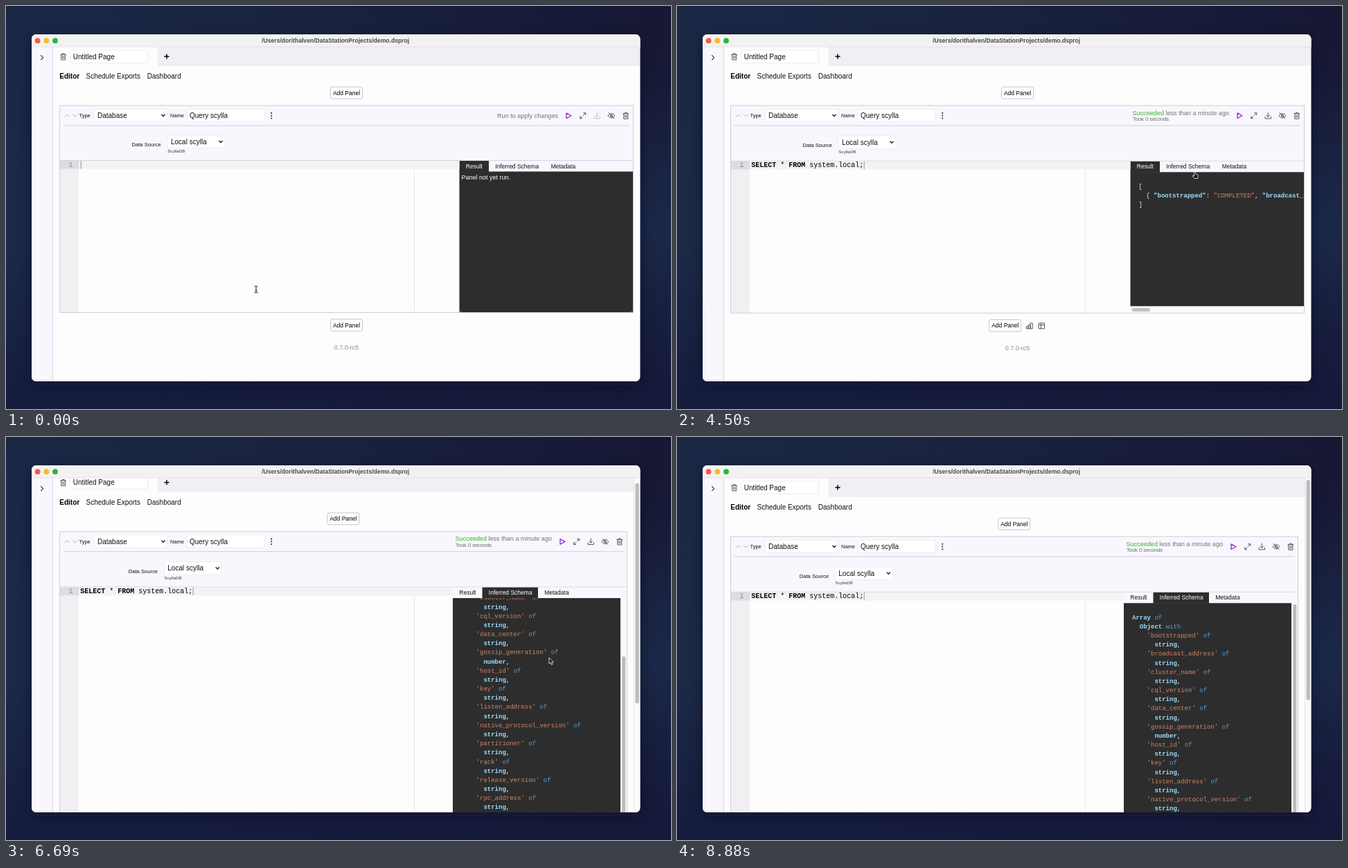
Animation of 960 by 583 pixels, one loop 8950 ms. Source, as an HTML page:

```html
<!DOCTYPE html>
<html lang="en">
<head>
<meta charset="utf-8">
<title>Query panel</title>
<style>
  html, body { margin: 0; width: 100%; height: 100%; overflow: hidden; background: #18203e; }
  svg { display: block; width: 100vw; height: 100vh; }
  text { font-family: "Liberation Sans", Arial, sans-serif; white-space: pre; }
  .mono { font-family: "Liberation Mono", "Courier New", monospace; }
  .b { font-weight: bold; }
  .key { fill: #9cdcfe; font-weight: bold; }
  .str { fill: #ce8567; }
  .word { fill: #569cd6; }
  .line { fill: none; stroke: #55555c; stroke-width: 1; stroke-linecap: round; stroke-linejoin: round; }
</style>
</head>
<body>
<svg id="stage" viewBox="0 0 960 583" preserveAspectRatio="none"></svg>
<script>
const LOOP = 8950;
const QUERY = 'SELECT * FROM system.local;';
const FIELDS = `bootstrapped broadcast_address cluster_name cql_version data_center gossip_generation
  host_id key listen_address native_protocol_version partitioner rack release_version rpc_address
  schema_version supported_features thrift_version tokens truncated_at`.split(/\s+/);

// Panel states: before the run, with the result, with the schema
const LAYOUTS = {
  idle:   { right: 905.5, split: 654.5, mid: 491.5, dy: 0,   bottom: 443.5 },
  result: { right: 905.5, split: 654.5, mid: 491.5, dy: 0.8, bottom: 444.2 },
  schema: { right: 896.5, split: 645,   mid: 486.8, dy: 0.8, bottom: 707 }
};

const TIMES = { focus: 550, type: 800, perChar: 68, run: 3350, done: 3600, schema: 4720 };
const PAGE_SCROLL = [[6600, 0], [6690, 7], [6900, 62], [7500, 210], [7680, 242], [8200, 242], [8700, 0]];
const CODE_SCROLL = [[5450, 0], [6000, 55.5], [6450, 100], [7880, 100], [8200, 0]];
const POINTER = [
  [0, 361, 410, 'beam'], [800, 361, 410, 'none'], [2750, 361, 410, 'beam'], [2950, 520, 325, 'beam'],
  [3150, 700, 205, 'arrow'], [3320, 812, 160, 'hand'], [3750, 812, 160, 'arrow'],
  [4400, 748, 243, 'hand'], [4500, 748, 245, 'hand'], [4680, 745, 234, 'hand'], [5000, 745, 234, 'arrow'],
  [5300, 789, 308, 'beam'], [6100, 789, 308, 'beam'], [6400, 785, 324, 'arrow'], [8550, 785, 325, 'none']
];

const rect = (x, y, w, h, fill, more = '') =>
  `<rect x="${x}" y="${y}" width="${w}" height="${h}" fill="${fill}" ${more}/>`;
const text = (x, y, size, str, fill = '#111', more = '') =>
  `<text x="${x}" y="${y}" font-size="${size}" fill="${fill}" ${more}>${str}</text>`;
const path = (d, more = '') => `<path class="line" d="${d}" ${more}/>`;
const icon = (x, y, d, more) => `<g transform="translate(${x} ${y})">${path(d, more)}</g>`;
const span = (cls, str) => `<tspan class="${cls}">${str}</tspan>`;
const code = (x, y, str) => text(x, y, 9, str, '#eee', 'class="mono"');

const ICONS = {
  trash: 'M-4-3H4M-1.5-3V-4.5H1.5V-3M-3-3V4.5H3V-3M-1-.8V2.4M1-.8V2.4',
  play: 'M-3-3.8L4 0L-3 3.8Z',
  expand: 'M1-4H4V-1M4-4L.7-.7M-1 4H-4V1M-4 4L-.7.7',
  download: 'M0-4.5V1.5M-2.5-.8L0 1.7L2.5-.8M-4.2 1.5V4.2H4.2V1.5',
  hidden: 'M-5 0Q0-6.5 5 0Q0 6.5-5 0M-1.6 0A1.6 1.6 0 1 0 1.6 0A1.6 1.6 0 1 0-1.6 0M-4-4.2L4 4.2',
  bars: 'M-4.3 1H-1.5V4H-4.3ZM-1.5-1.3H1.4V4H-1.5ZM1.4-4H4.3V4H1.4Z',
  table: 'M-4-4H4V4H-4ZM-4-1.2H4M-1-4V4'
};

const field = (x, y, w) => rect(x, y, w, 18.5, '#fff', 'rx="2" stroke="#ededf1"');
const select = (x, y, w, label) => field(x, y, w) + text(x + 5, y + 12.8, 10, label) +
  icon(x + w - 6, y + 9.3, 'M-2.2-1.1L0 1.2L2.2-1.1', 'style="stroke:#222;stroke-width:1.4"');
const button = (mid, y) => rect(mid - 23, y - 8.5, 46, 17, '#fff', 'rx="2" stroke="#c5c4ce"') +
  text(mid, y + 3, 8.5, 'Add Panel', '#000', 'text-anchor="middle"');

function schemaLines() {
  const of = ' ' + span('word', 'of'), string = span('key', 'string') + ',';
  const lines = [span('key', 'Array') + of, '  ' + span('key', 'Object') + ' ' + span('word', 'with')];
  for (const name of FIELDS) {
    lines.push('    ' + span('str', `'${name}'`) + of);
    if (name === 'tokens') lines.push('      ' + span('key', 'Array') + of, '        ' + string);
    else if (name === 'truncated_at') lines.push('      ' + span('word', 'null'));
    else lines.push('      ' + (name === 'gossip_generation' ? span('key', 'number') + ',' : string));
  }
  return lines;
}

function toolbar(name, { right }) {
  const idle = name === 'idle', at = x => right - 905.5 + x;
  const status = idle
    ? text(at(797), 161.8, 9.1, 'Run to apply changes', '#737378', 'text-anchor="end"')
    : text(at(797), 157.6, 9.1, '<tspan fill="#37b526">Succeeded</tspan> less than a minute ago', '#737378', 'text-anchor="end"') +
      text(at(658), 166, 7.5, 'Took 0 seconds', '#66666b');
  return status +
    icon(at(812), 158.7, ICONS.play, 'style="stroke:#8b2fc9;stroke-width:1.3"') +
    icon(at(832.7), 158.7, ICONS.expand) +
    icon(at(853.3), 158.7, ICONS.download, idle ? 'style="stroke:#c2c2c8"' : '') +
    icon(at(874), 158.7, ICONS.hidden) + icon(at(894.8), 158.7, ICONS.trash);
}

function results(name, { right, split, dy, bottom }) {
  const schema = name === 'schema';
  const top = 239.5 + dy, edge = schema ? 887 : right, base = split + 12;
  const tab = (x, label, on) => text(split + x, 234.5 + dy, 8.5, label, on ? '#fff' : '#111');
  const low = name === 'result' ? 434.5 : bottom;
  let out = rect(split, 224 + dy, right - split, 16, '#f8f7fd') +
    rect(split + (schema ? 42.5 : 0), 224 + dy, schema ? 80.5 : 42.5, 16, '#2d2d2d') +
    tab(9.3, 'Result', !schema) + tab(51.8, 'Inferred Schema', schema) + tab(132.2, 'Metadata') +
    rect(split, top, edge - split, low - top, '#2d2d2d');
  if (name === 'idle') {
    out += text(657.5, 251, 9, 'Panel not yet run.', '#fff');
  } else if (name === 'result') {
    const row = '  { ' + span('key', '"bootstrapped"') + ': ' + span('str', '"COMPLETED"') + ', ' + span('key', '"broadcast_address"');
    out += `<g clip-path="url(#resultBox)">${['[', row, ']'].map((s, i) => code(base, 263.7 + i * 13.17, s)).join('')}</g>` +
      rect(split, 434.5, right - split, 9.5, '#fafafa') + rect(656.5, 437, 26.5, 5, '#c1c1c1', 'rx="2.5"');
  } else {
    out += `<g clip-path="url(#schemaBox)"><g id="schemaCode">${schemaLines().map((s, i) => code(base, 263.7 + i * 13.17, s)).join('')}</g></g>` +
      rect(887, top, 9.5, bottom - top, '#fafafa') + rect(889.3, 242, 5, 381, '#bcbcbc', 'rx="2.5" id="codeThumb"');
  }
  const grip = `M${split + 1} ${bottom - 3}l2.5 2.5`;
  return out + (name === 'result' ? '' : path(grip + (schema ? '' : 'M904.5 440.5l-2.5 2.5'), 'style="stroke:#999;stroke-width:.7"'));
}

function scene(name) {
  const lay = LAYOUTS[name], { right, mid, dy, bottom } = lay;
  const shift = mid - 491.5, foot = bottom + 18.1, end = right + 9.5;
  const idle = name === 'idle', footMid = idle ? mid : mid - 17.7;
  return `<g id="${name}">` +
    rect(219, 59, end - 219, 28, '#f0eff4') + button(mid, 125.6) +
    rect(77.5, 144, right - 77.5, bottom - 144, '#fdfdfe') +
    rect(77.5, 144, right - 77.5, 79.5 + dy, '#f8f7fd') +
    path(`M83 173H${right - 5.5}`, 'style="stroke:#cfced9"') +
    toolbar(name, lay) +
    text(181.5 + shift, 203.2 + dy, 7.6, 'Data Source') +
    select(233 + shift, 187 + dy, 83, 'Local scylla') +
    text(233.2 + shift, 212 + dy, 6.2, 'ScyllaDB', '#333') +
    rect(78, 223.5 + dy, 27, bottom - 223.5 - dy, '#f0f0f3') +
    path(`M589.5 ${236 + dy}V${bottom}`, 'style="stroke:#e6e6ea"') +
    path(`M78 ${223.5 + dy}H${right}`, 'style="stroke:#d4d3dc"') +
    results(name, lay) +
    rect(77.5, 144, right - 77.5, bottom - 144, 'none', 'stroke="#cfced8"') +
    button(footMid, foot) +
    (idle ? '' : icon(mid + 17.4, foot + .5, ICONS.bars) + icon(mid + 35, foot + .5, ICONS.table)) +
    text(mid, bottom + 53.5, 9, '0.7.0-rc5', '#88888d', 'text-anchor="middle"') + '</g>';
}

const header =
  rect(68, 59, 151, 28, '#fdfdfe') + icon(82.7, 73.3, ICONS.trash) + field(92.5, 64, 112) +
  text(96.7, 76.7, 10, 'Untitled Page') + path('M229 73H235M232 70V76', 'style="stroke:#000;stroke-width:1.5"') +
  text(77.3, 105.4, 10, 'Editor', '#000', 'class="b"') + text(115.5, 105.4, 10, 'Schedule Exports') +
  text(203.8, 105.4, 10, 'Dashboard');
const panelHead =
  path('M85.2 160L88.2 157L91.2 160M96.5 157L99.5 160L102.5 157', 'style="stroke:#b4b4bc"') +
  text(105.5, 161, 7.5, 'Type') + select(127, 149, 106, 'Database') +
  text(237, 161, 7.5, 'Name') + field(261.5, 149, 111.5) + text(265, 161.8, 10, 'Query scylla') +
  [154.9, 158.6, 162.3].map(y => `<circle cx="383.2" cy="${y}" r="1.1" fill="#333"/>`).join('');
const light = (x, fill) => `<circle cx="${x}" cy="50.2" r="3.9" fill="${fill}"/>`;

const stage = document.getElementById('stage');
stage.innerHTML = `
  <defs>
    <linearGradient id="sky" x1="0" y1=".4" x2="1" y2="0">
      <stop offset="0" stop-color="#1b2947"/><stop offset=".5" stop-color="#192340"/><stop offset="1" stop-color="#161733"/>
    </linearGradient>
    <radialGradient id="glow" cx="1" cy=".55" r=".4">
      <stop offset="0" stop-color="#1b2848"/><stop offset="1" stop-color="#1b2848" stop-opacity="0"/>
    </radialGradient>
    <linearGradient id="low" x1="0" y1="0" x2="0" y2="1">
      <stop offset=".6" stop-color="#14173a" stop-opacity="0"/><stop offset="1" stop-color="#14173a" stop-opacity=".75"/>
    </linearGradient>
    <filter id="blur" x="-10%" y="-10%" width="120%" height="125%"><feGaussianBlur stdDeviation="9"/></filter>
    <clipPath id="window">${rect(37, 41, 878.5, 502, '#000', 'rx="6.5"')}</clipPath>
    <clipPath id="resultBox">${rect(654.5, 240.3, 251, 194, '#000')}</clipPath>
    <clipPath id="schemaBox">${rect(645, 240.3, 242, 466.7, '#000')}</clipPath>
  </defs>
  ${['sky', 'glow', 'low'].map(id => rect(0, 0, 960, 583, `url(#${id})`)).join('')}
  ${rect(37, 49, 878, 500, '#080b1c', 'rx="8" opacity=".5" filter="url(#blur)"')}
  <g clip-path="url(#window)">
    ${rect(37, 41, 879, 502, '#fdfdfe')}
    <g id="page">
      ${Object.keys(LAYOUTS).map(scene).join('')}${header}${panelHead}
      <g id="editor">
        ${rect(78, 224, 27, 11.7, '#dddde1')}${rect(105, 224, 549.5, 11.7, '#f3f3f4', 'id="active"')}
        ${text(90.5, 232.7, 10, '1', '#8c8c90', 'class="mono"')}
        ${text(107.3, 232.7, 10, '', '#000', 'class="mono" id="query"')}
        ${rect(0, 224, 1, 11.5, '#000', 'id="caret"')}
      </g>
    </g>
    <g id="pageBar">
      ${rect(906.5, 59, 9, 484, '#fafafa')}${path('M906.5 59V543', 'style="stroke:#e6e6ea"')}
      ${rect(908.5, 62, 5.3, 318.5, '#bcbcbc', 'rx="2.6" id="pageThumb"')}
    </g>
    ${rect(37, 59, 30.5, 484, '#f8f7fd')}${path('M67.5 59V543M37 541.8H67.5', 'style="stroke:#d6d5de"')}
    ${path('M50.5 71.5L53.7 74.6L50.5 77.7', 'style="stroke:#444;stroke-width:1.2"')}
    ${rect(37, 41, 879, 18, '#f3f2f2')}${path('M37 59H916', 'style="stroke:#dedde0;stroke-width:.8"')}
    ${light(45.6, '#f7564f')}${light(58.3, '#fbb92c')}${light(71, '#28b83c')}
    ${text(475.7, 53, 8.6, '/Users/dorithalven/DataStationProjects/demo.dsproj', '#4a4a4c', 'class="b" text-anchor="middle"')}
  </g>
  <g id="pointer">
    <g id="beam"><path class="line" d="M-2-5Q0-5 0-3.5Q0-5 2-5M0-3.5V3.5M-2 5Q0 5 0 3.5Q0 5 2 5M-1 1.5H1"/></g>
    <path id="arrow" d="M0-5V4L2.1 2.1L3.6 5.3L5.1 4.6L3.6 1.6H6.3Z" transform="translate(-1)" fill="#111" stroke="#fff" stroke-width=".8"/>
    <path id="hand" d="M-1.6-4.5Q-.5-5.5.3-4.2L1-1.4L3.6-.8Q4.6-.4 4.2 1.2L3.4 4.5H-.8L-3.6 1.2Q-3.7 0-2.2.4L-1 1.2Z" fill="#111" stroke="#fff" stroke-width=".8"/>
  </g>`;

const ui = {};
stage.querySelectorAll('g[id], rect[id], text[id], path[id]').forEach(el => ui[el.id] = el);
const show = (el, on) => el.style.display = on ? '' : 'none';
const move = (el, x, y) => el.setAttribute('transform', `translate(${x} ${y})`);

function sample(steps, t, col = 1) {
  const next = steps.findIndex(step => step[0] > t);
  if (next < 0) return steps[steps.length - 1][col];
  if (next === 0) return steps[0][col];
  const a = steps[next - 1], b = steps[next];
  return a[col] + (b[col] - a[col]) * (t - a[0]) / (b[0] - a[0]);
}

function drawPointer(t) {
  const x = sample(POINTER, t), y = sample(POINTER, t, 2);
  const kind = POINTER.filter(step => step[0] <= t).pop()[3];
  for (const name of ['beam', 'arrow', 'hand']) show(ui[name], name === kind);
  ui.beam.firstElementChild.style.stroke = x > 645 && y > 240 ? '#f2f2f2' : '#222';
  move(ui.pointer, x, y);
}

function render(t) {
  const state = t < TIMES.done ? 'idle' : t < TIMES.schema ? 'result' : 'schema';
  for (const name in LAYOUTS) show(ui[name], name === state);
  show(ui.pageBar, state === 'schema');

  const page = sample(PAGE_SCROLL, t), inner = sample(CODE_SCROLL, t);
  move(ui.page, 0, -page);
  move(ui.schemaCode, 0, -inner);
  move(ui.pageThumb, 0, page * 0.662);
  move(ui.codeThumb, 0, inner * 0.825);
  move(ui.editor, 0, LAYOUTS[state].dy);

  const count = Math.max(0, Math.min(QUERY.length, Math.floor((t - TIMES.type) / TIMES.perChar)));
  const focused = t >= TIMES.focus && t < TIMES.run;
  ui.query.innerHTML = QUERY.slice(0, count).replace(/SELECT|FROM/g, word => span('b', word));
  ui.caret.setAttribute('x', 107.7 + count * 6);
  ui.caret.setAttribute('fill', focused ? '#000' : '#999');
  ui.active.setAttribute('fill', focused ? '#ffffc8' : '#f3f3f4');
  ui.active.setAttribute('width', LAYOUTS[state].split - 105);
  drawPointer(t);
}

function tick() {
  render(performance.now() % LOOP);
  requestAnimationFrame(tick);
}
tick();
</script>
</body>
</html>
```
